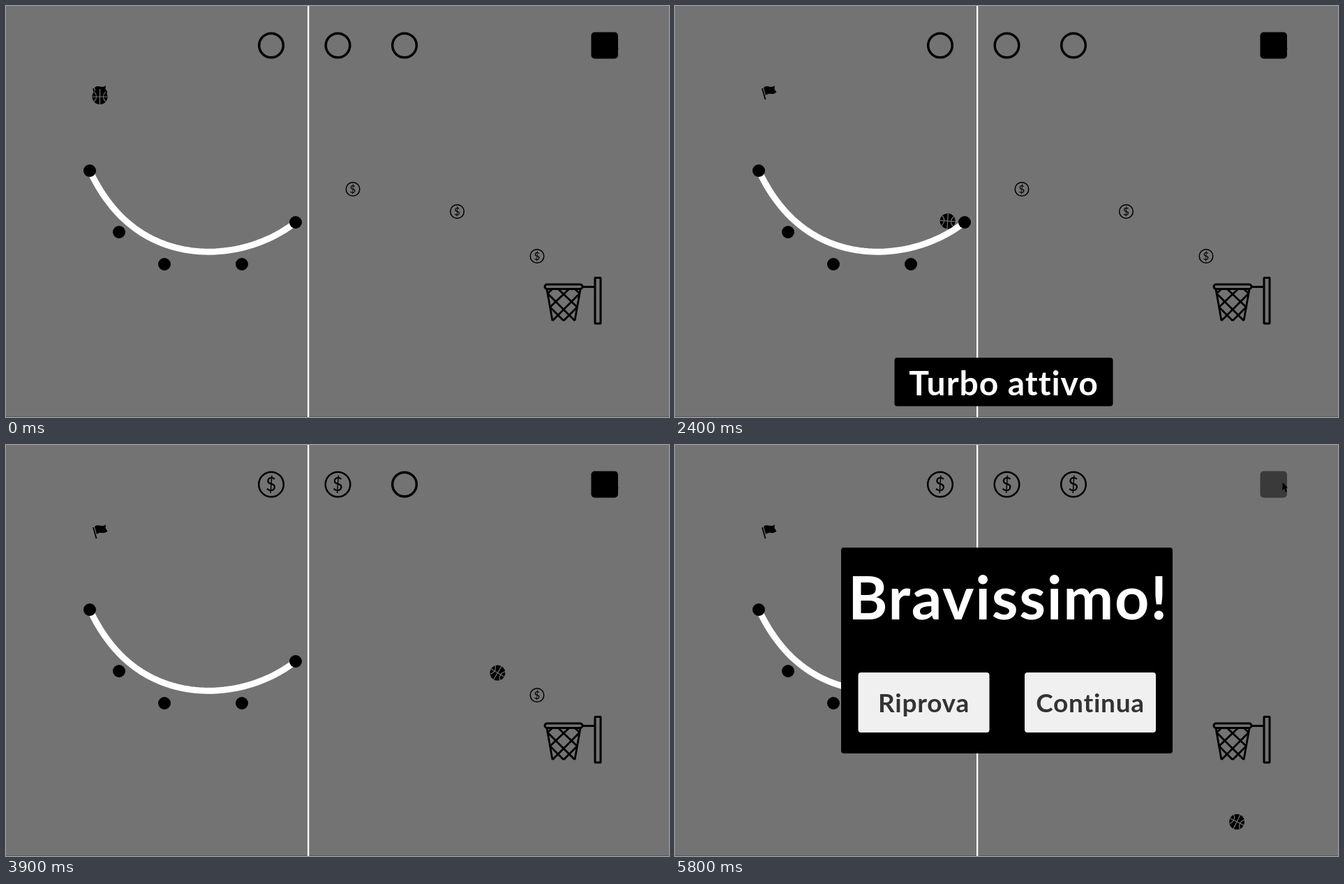
An HTML page with a canvas that plays this animation: 950 px wide and 589 px high, repeating every 5.9 s.

```html
<!DOCTYPE html>
<html lang="it">
<head>
<meta charset="utf-8">
<title>Canestro</title>
<style>
  html, body { margin: 0; width: 100%; height: 100%; overflow: hidden; background: #737373; }
  canvas { display: block; }
</style>
</head>
<body>
<canvas id="stage" width="950" height="589"></canvas>
<script>
const ctx = document.getElementById('stage').getContext('2d');
const LOOP = 5900, STEP = 100, BG = '#737373';
const FONT = 'Lato, "Open Sans", sans-serif';

// Ramp: a quartic Bezier through these handles
const handles = [[120, 236], [162, 324], [227, 370], [338, 370], [415, 310]];
const coins = [
  { x: 497, y: 262.5, slot: 380, at: 3000 },
  { x: 646.5, y: 294.5, slot: 475.5, at: 3700 },
  { x: 761, y: 358.5, slot: 571, at: 4100 },
];

const clamp = v => Math.max(0, Math.min(1, v));
const lerp = (a, b, s) => a + (b - a) * s;
const grey = v => `rgb(${v},${v},${v})`;

function bezier(u, points = handles) {
  while (points.length > 1) {
    points = points.slice(1).map((p, i) => p.map((v, k) => lerp(points[i][k], v, u)));
  }
  return points[0];
}

// Ball centre while it rests on the ramp, pushed out along the normal
function onRamp(u) {
  const [x, y] = bezier(u);
  const [ax, ay] = bezier(u - 0.01), [bx, by] = bezier(u + 0.01);
  const dx = bx - ax, dy = by - ay, k = 15.5 / Math.hypot(dx, dy);
  return [x + dy * k, y - dx * k];
}

function ballAt(t) {
  if (t < 850) {                       // free fall
    const s = t / 100;
    return [134.5, 130 + 6 * s + 0.68 * s * s];
  }
  if (t < 2483) return onRamp((t - 850) / 1633);
  if (t < 4150) {                      // flight, faster once the turbo kicks in
    const s = (t - 3000) / 100;
    return [474 + s * (s < 0 ? 13.2 : 25.6), 257 - 2.35 * s + 1.12 * s * s];
  }
  if (t < 4900) {                      // bounce inside the rim
    const q = (t - 4150) / 750;
    return [lerp(768, 789, q) + 32 * Math.sin(Math.PI * q), lerp(378, 410, q)];
  }
  const s = (t - 4900) / 100;          // drop through the net
  return [789 + 1.78 * s, 410 + 6.7 * s + 0.86 * s * s];
}

function line(points, width, color = '#000') {
  ctx.beginPath();
  points.forEach(p => ctx.lineTo(...p));
  ctx.lineWidth = width;
  ctx.strokeStyle = color;
  ctx.stroke();
}

function circle(x, y, r) {
  ctx.beginPath();
  ctx.arc(x, y, r, 0, 7);
}

function disc(x, y, r) {
  circle(x, y, r);
  ctx.fillStyle = '#000';
  ctx.fill();
}

function ring(x, y, r, width) {
  circle(x, y, r);
  ctx.lineWidth = width;
  ctx.strokeStyle = '#000';
  ctx.stroke();
}

function box(x, y, w, h, r, color) {
  ctx.beginPath();
  ctx.roundRect(x, y, w, h, r);
  ctx.fillStyle = color;
  ctx.fill();
}

function frame(x, y, w, h, r) {
  ctx.beginPath();
  ctx.roundRect(x, y, w, h, r);
  ctx.lineWidth = 3;
  ctx.strokeStyle = '#000';
  ctx.stroke();
}

function text(str, x, y, size, color, weight = 700) {
  ctx.font = `${weight} ${size}px ${FONT}`;
  ctx.letterSpacing = `${size * 0.02}px`;
  ctx.textAlign = 'center';
  ctx.fillStyle = color;
  ctx.fillText(str, x, y);
}

function coin(x, y, r, width, size) {
  ring(x, y, r, width);
  text('$', x, y + size * 0.36, size, '#000', 400);
}

function flag() {
  line([[125, 118], [129.5, 134]], 1.8);
  ctx.beginPath();
  ctx.moveTo(127, 117);
  ctx.bezierCurveTo(132, 112, 137, 119, 143, 114);
  ctx.lineTo(142.5, 119);
  ctx.lineTo(145.5, 123.5);
  ctx.bezierCurveTo(139, 129, 136, 123, 130, 128);
  ctx.fillStyle = '#000';
  ctx.fill();
}

// Net: diagonals of a lattice that narrows towards the bottom
function net() {
  const top = 406, bottom = 451, rise = 39;
  const at = (c, y) => [799 + (2 * c - 1) * lerp(24, 16, (y - top) / (bottom - top)), y];
  for (const flip of [c => c, c => 1 - c]) {
    line([at(flip(0), top), at(flip(0), bottom)], 2.8);
    for (let c = -1; c < 1; c += 0.5) {
      const low = Math.max(c, 0);
      const high = Math.min(1, c + (bottom - top) / rise);
      line([low, high].map(v => at(flip(v), bottom - (v - c) * rise)), 2.8);
    }
  }
}

function hoop() {
  frame(772, 399, 54, 6.5, 3.2);
  line([[827, 402.5], [843, 402.5]], 3);
  frame(844, 389.5, 8, 65.5, 0.5);
  net();
}

function ball(x, y) {
  ctx.save();
  ctx.translate(x, y);
  ctx.rotate((x - 134.5) * Math.PI / 51);
  disc(0, 0, 11);
  ctx.clip();
  line([[-11, 0], [11, 0]], 1.2, BG);
  line([[0, -11], [0, 11]], 1.2, BG);
  for (const side of [-1, 1]) {
    circle(side * 14, 0, 9);
    ctx.stroke();
  }
  ctx.restore();
}

function cursor() {
  ctx.beginPath();
  [[870.5, 53.5], [870.5, 65], [873, 62.5], [875, 67.5], [877, 66.5], [875, 62], [878, 61.5]]
    .forEach(p => ctx.lineTo(...p));
  ctx.fillStyle = '#000';
  ctx.fill();
}

function toast() {
  box(314.5, 504, 313, 69.5, 4, '#000');
  text('Turbo attivo', 471, 558, 48, '#fff');
}

function panel(scale) {
  ctx.save();
  ctx.translate(475.5, 294.5);
  ctx.scale(scale, scale);
  ctx.translate(-475.5, -294.5);
  box(238, 147, 475, 295, 4, '#000');
  text('Bravissimo!', 477.5, 250, 86, '#fff');
  for (const [label, x] of [['Riprova', 262.5], ['Continua', 501]]) {
    box(x, 326, 188, 86, 4, grey(Math.round(lerp(219, 240, scale))));
    text(label, x + 94, 383, 37, '#333');
  }
  ctx.restore();
}

function draw(t) {
  ctx.fillStyle = BG;
  ctx.fillRect(0, 0, 950, 589);
  ctx.fillStyle = '#5c5c5c';
  ctx.fillRect(0, 588, 950, 1);
  ctx.fillStyle = '#fff';
  ctx.fillRect(432, 0, 2.3, 589);

  line(Array.from({ length: 61 }, (_, i) => bezier(i / 60)), 9, '#fff');
  handles.forEach(([x, y]) => disc(x, y, 9));
  flag();

  for (const c of coins) {
    if (t < c.at) {
      coin(c.x, c.y, 9.8, 1.5, 15);
      ring(c.slot, 56.5, 17.3, 3.5);
    } else {
      coin(c.slot, 56.5, 17.8, 2.5, 26);
    }
  }

  const glow = t < 4900 ? 0 : Math.round(lerp(51, 58, clamp((t - 4900) / 200)));
  box(838.5, 37.5, 38.5, 38, 5, grey(glow));
  cursor();
  hoop();
  ball(...ballAt(t));

  if (t >= 2300 && t < 3600) toast();
  if (t > 4800) panel(clamp((t - 4800) / 298));
}

const start = performance.now();
function tick() {
  const t = (performance.now() - start) % LOOP;
  draw(Math.floor(t / STEP) * STEP);
  requestAnimationFrame(tick);
}
tick();
</script>
</body>
</html>
```
